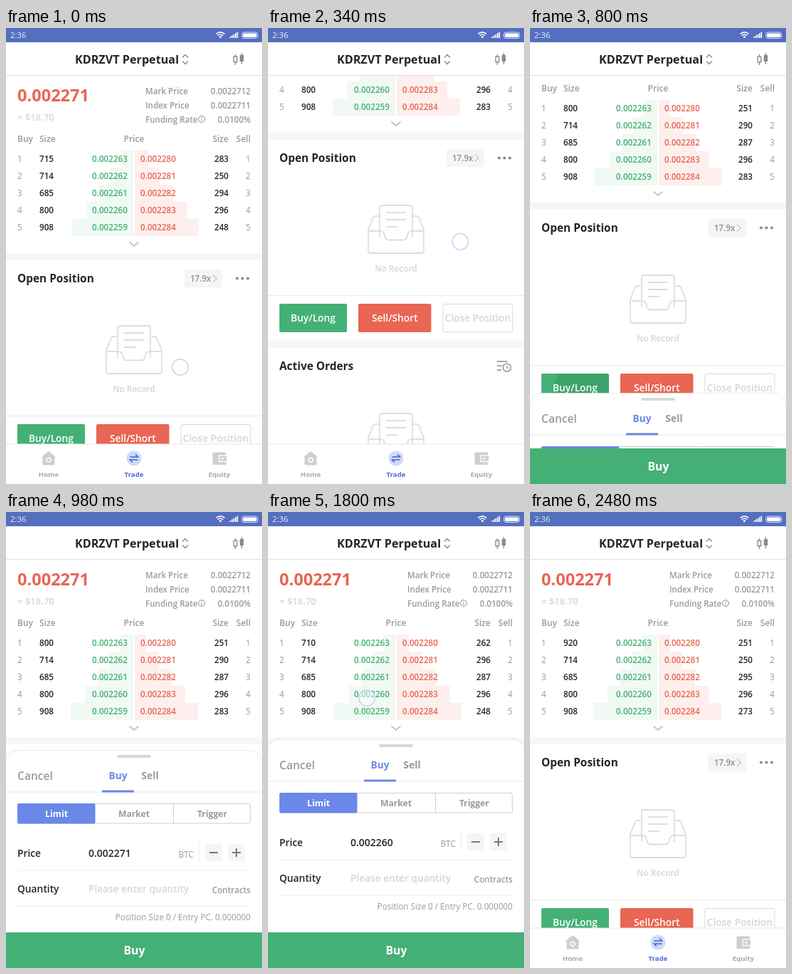
Write an HTML page that moves like this. It is 360 px wide and 640 px high and loops after 2.98 s.

```html
<!DOCTYPE html>
<html lang="en">
<head>
<meta charset="utf-8">
<title>Trade screen</title>
<style>
html, body { margin: 0; width: 100%; height: 100%; overflow: hidden; background: #fff; }
svg { display: block; width: 100vw; height: 100vh; font-family: "Open Sans", "Noto Sans", sans-serif; }
text { white-space: pre; }
</style>
</head>
<body>
<svg id="stage" viewBox="0 0 360 640" xmlns="http://www.w3.org/2000/svg"></svg>
<script>
const LOOP = 2980;
const GREEN = '#45b076', RED = '#e96554', BLUE = '#6a88e8', INK = '#24242a', GREY = '#9a9a9a', PALE = '#d6d6d6';
const stage = document.getElementById('stage');

// Order book states: [start ms, buy sizes, sell sizes, sell depth width]
const BOOKS = [
  [0, [715, 714, 685, 800, 908], [283, 250, 294, 296, 248], 90],
  [260, [800, 714, 685, 800, 908], [251, 290, 287, 296, 283], 89],
  [1300, [710, 714, 685, 800, 908], [262, 296, 287, 296, 248], 91],
  [1920, [920, 714, 685, 800, 908], [251, 250, 295, 296, 273], 88]
];
const PRICES = [[0, '0.002271'], [1320, '0.002282'], [1720, '0.002260']];

const text = (x, y, s, size, fill, weight = 500, anchor = 'start', id = '') =>
  `<text ${id && `id="${id}"`} x="${x}" y="${y}" font-size="${size}" fill="${fill}" font-weight="${weight}" text-anchor="${anchor}">${s}</text>`;
const rect = (x, y, w, h, fill, more = '') =>
  `<rect x="${x}" y="${y}" width="${w}" height="${h}" fill="${fill}" ${more}/>`;
const path = (d, stroke, width = 1, more = 'fill="none"') =>
  `<path d="${d}" stroke="${stroke}" stroke-width="${width}" ${more}/>`;
const dot = (x, y, r, fill, more = '') => `<circle cx="${x}" cy="${y}" r="${r}" fill="${fill}" ${more}/>`;

function statusBar() {
  const bars = [0, 1, 2, 3, 4].map(i => rect(314.5 + i * 2.5, 12 - i * 1.6, 1.7, 2 + i * 1.6, '#fff')).join('');
  return rect(0, 0, 360, 20, '#536fbe') +
    text(6, 14.3, '2:36', 11.3, '#eef1fc', 400) +
    path('M295.5 8.4Q301.5 3.4 307.5 8.4M297.6 10.6Q301.5 7.4 305.4 10.6', '#fff', 1.5) +
    path('M299.3 12L301.5 14.4L303.7 12Q301.5 10.4 299.3 12Z', 'none', 0, 'fill="#fff"') + bars +
    rect(331.5, 6, 22.5, 8.5, 'none', 'rx="3.5" stroke="#dbe2fa"') + rect(333, 7.5, 19.5, 5.5, '#fff', 'rx="2"');
}

function header() {
  return rect(0, 20, 360, 46, '#fff') + rect(0, 66, 360, 1, '#e2e2e2') +
    text(170, 49.5, 'KDRZVT Perpetual', 16.2, INK, 700, 'middle') +
    path('M248 41.5L252 37.5L256 41.5M248 46.5L252 50.5L256 46.5', '#8a8a8a', 1.4) +
    path('M322.5 37V40M322.5 48V52', '#8a8a8a', 1.4) + rect(320.2, 40.2, 4.6, 7.6, '#fff', 'stroke="#8a8a8a" stroke-width="1.4"') +
    path('M331.5 35V51', '#8a8a8a', 1.4) + rect(328.8, 38, 5.4, 9, '#8a8a8a');
}

function summary() {
  const pairs = [['Mark Price', '0.0022712', 93], ['Index Price', '0.0022711', 113], ['Funding Rate', '0.0100%', 132.5]];
  return text(16, 103, '0.002271', 23.6, RED, 700) + text(16, 129.5, '≈ $18.70', 13.1, PALE, 600) +
    pairs.map(([a, b, y]) => text(196, y, a, 11.6, GREY, 600) + text(344, y, b, 11.6, GREY, 600, 'end')).join('') +
    dot(275, 128, 4.4, 'none', 'stroke="#8a8a8a"') + path('M275 125.4V126.6M275 127.6V130.6', '#8a8a8a');
}

function book() {
  let s = text(16, 160, 'Buy', 12, GREY, 600) + text(47, 160, 'Size', 12, GREY, 600) +
    text(180, 160, 'Price', 12, GREY, 600, 'middle') + text(313, 160, 'Size', 12, GREY, 600, 'end') +
    text(344, 160, 'Sell', 12, GREY, 600, 'end');
  for (let i = 0; i < 5; i++) {
    const y = 188.3 + i * 24, top = 172 + i * 24;
    s += rect(0, top, 0, 24, '#f0f9f3', `id="bb${i}"`) + rect(181, top, 0, 24, '#fdefed', `id="sb${i}"`) +
      text(16, y, i + 1, 11.7, GREY) + text(47, y, '', 11.7, INK, 600, 'start', 'bs' + i) +
      text(121, y, '0.00' + (2263 - i), 11.7, GREEN, 600) +
      text(189, y, '0.00' + (2280 + i), 11.7, RED, 600) +
      text(313, y, '', 11.7, INK, 600, 'end', 'ss' + i) + text(344, y, i + 1, 11.7, GREY, 500, 'end');
  }
  return s + path('M173.5 300.5L180 306L186.5 300.5', '#c4c4c4', 1.8);
}

const emptyTray = dy => `<g transform="translate(0 ${dy})">` +
  path('M155.5 433H151Q149 433 148 435L141 452V482Q141 485 144 485H216Q219 485 219 482V452L212 435Q211 433 209 433H204.5', '#dedede', 1.8) +
  path('M157 463V421Q157 418 160 418H200Q203 418 203 421V463', '#dedede', 1.8) +
  path('M141 454H158Q162 454 163.5 458L165 463Q166 466.5 169 466.5H191Q194 466.5 195 463L196.5 458Q198 454 202 454H219', '#dedede', 1.8, 'fill="#fff"') +
  path('M166 428H194M166 438H194M166 448H182', '#dedede', 1.8) +
  text(180, 511, 'No Record', 11.9, PALE, 600, 'middle') + '</g>';

function position() {
  return rect(0, 316, 360, 10, '#f6f6f6') + text(16, 357.2, 'Open Position', 15.4, INK, 700) +
    rect(251, 339, 53, 25, '#f5f5f5', 'rx="2"') + text(259, 355.8, '17.9x', 11.6, '#8f8f8f', 600) +
    path('M291 346.5L296.5 351.5L291 356.5', '#c4c4c4', 1.2) +
    [325, 332.5, 340].map(x => dot(x, 351.5, 2.1, '#8c8c8c')).join('') +
    emptyTray(0) + rect(0, 544, 360, 1, '#e8e8e8') +
    rect(16, 556, 95, 40, GREEN, 'rx="2"') +
    `<g clip-path="url(#buyClip)">${dot(75, 576, 0, '#00461c', 'id="ripple"')}</g>` +
    rect(127, 556, 102.5, 40, RED, 'rx="2"') + rect(246, 556.5, 98, 39, '#fff', 'rx="2" stroke="#d9d9d9"') +
    text(63.5, 581.2, 'Buy/Long', 13.8, '#fff', 600, 'middle') +
    text(178.3, 581.2, 'Sell/Short', 13.8, '#fff', 600, 'middle') +
    text(295, 581.2, 'Close Position', 13.7, PALE, 600, 'middle');
}

function orders() {
  return rect(0, 608, 360, 10, '#f6f6f6') + text(16, 649.2, 'Active Orders', 15.4, INK, 700) +
    path('M322 637H337M322 643H329M322 649H328', '#8c8c8c', 1.4) +
    dot(336, 645.5, 5.6, '#fff', 'stroke="#8c8c8c" stroke-width="1.4"') + path('M336 642.5V646H338.8', '#8c8c8c', 1.2) +
    emptyTray(292);
}

function nav() {
  return rect(0, 584, 360, 56, '#fff') + rect(0, 583.5, 360, 1, '#e8e8e8') +
    path('M60 594L70.5 602.5H68.5V612Q68.5 613.5 67 613.5H53Q51.5 613.5 51.5 612V602.5H49.5Z', 'none', 0, 'fill="#cfcfcf"') +
    dot(60, 606.3, 3, 'none', 'stroke="#fff" stroke-width="1.6"') +
    dot(180, 604, 10.5, '#cfdaf9') +
    path('M174.5 602H185.5L182 598.5M185.5 606H174.5L178 609.5', '#3f60d4', 1.6) +
    rect(290.5, 595.5, 19, 17.5, '#cfcfcf', 'rx="1.5"') +
    rect(299.5, 600, 11.5, 8.5, '#cfcfcf', 'stroke="#fff" stroke-width="1.4"') + dot(304, 604.2, 1.5, '#fff') +
    text(60, 630, 'Home', 9.6, '#a8a8a8', 700, 'middle') + text(180, 630, 'Trade', 9.6, '#4a69dc', 700, 'middle') +
    text(300, 630, 'Equity', 9.6, '#a8a8a8', 700, 'middle');
}

function sheet() {
  return rect(0, 319, 360, 60, '#000', 'rx="17" opacity=".025"') + rect(-.5, 319.7, 361, 350, '#fff', 'rx="17" stroke="#ececec"') +
    rect(156, 326, 48, 4, '#d8d8d8', 'rx="2"') + text(16, 361.3, 'Cancel', 15.6, GREY, 600) +
    rect(0, 377.5, 360, 1, '#e6e6e6') + rect(135, 375.5, 45, 3, BLUE) +
    text(157.5, 360.3, 'Buy', 13.7, BLUE, 700, 'middle') + text(202.5, 360.3, 'Sell', 14, GREY, 700, 'middle') +
    rect(16.5, 394.5, 327, 27.5, '#fff', 'rx="2" stroke="#cfcfcf"') + rect(16, 394, 109.5, 28.5, BLUE, 'rx="2"') +
    rect(235, 394.5, 1, 27.5, '#cfcfcf') +
    text(71, 412.8, 'Limit', 12.4, '#fff', 700, 'middle') + text(180, 412.8, 'Market', 12.2, GREY, 700, 'middle') +
    text(290, 412.8, 'Trigger', 12.2, GREY, 700, 'middle') +
    text(16, 468.5, 'Price', 13.8, INK, 600) + text(116, 468.5, '', 14, INK, 600, 'start', 'price') +
    text(264, 469.8, 'BTC', 12, GREY, 500, 'end') + rect(271.5, 449, 1, 27, '#ececec') +
    rect(280, 451, 24, 24, '#f5f5f5', 'rx="2"') + rect(312, 451, 24, 24, '#f5f5f5', 'rx="2"') +
    path('M286 463H298M318 463H330M324 457V469', '#777', 2) +
    rect(16, 487.5, 328, 1, '#ebebeb') + text(16, 518.7, 'Quantity', 13.8, INK, 600) +
    text(116, 518.5, 'Please enter quantity', 13.7, PALE, 600) + text(344, 520, 'Contracts', 11.7, GREY, 600, 'end') +
    rect(16, 537.5, 328, 1, '#ebebeb') +
    text(344, 558, 'Position Size 0 / Entry PC. 0.000000', 11.7, GREY, 500, 'end');
}

stage.innerHTML =
  `<defs><clipPath id="buyClip">${rect(16, 556, 95, 40, '#000', 'rx="2"')}</clipPath></defs>` +
  rect(0, 0, 360, 640, '#fff') +
  `<g id="page">${summary()}${book()}${position()}${orders()}</g>` + header() + statusBar() + nav() +
  `<g id="sheet">${sheet()}</g>` +
  `<g id="submit">${rect(0, 590, 360, 50, GREEN)}${text(180.5, 620.8, 'Buy', 15.8, '#fff', 700, 'middle')}</g>` +
  dot(0, 0, 11.3, '#fff', 'id="touch" fill-opacity=".45" stroke="#ccd3f0" stroke-width="1.5"');

const $ = id => document.getElementById(id);
const set = (id, attrs) => { for (const k in attrs) $(id).setAttribute(k, attrs[k]); };
const clamp = v => Math.max(0, Math.min(1, v));
const ramp = (t, start, span) => clamp((t - start) / span);
const easeOut = (t, start, span, power) => 1 - Math.pow(1 - ramp(t, start, span), power);
const current = (list, t) => list.filter(e => e[0] <= t).pop();

let shown;
function showBook(entry) {
  if (shown === entry) return;
  shown = entry;
  const [, buys, sells, depth] = entry;
  const total = sells.reduce((a, b) => a + b);
  let buy = 0, sell = 0;
  for (let i = 0; i < 5; i++) {
    buy += buys[i];
    sell += sells[i];
    const w = buy / 44.4;
    set('bb' + i, { x: 179 - w, width: w });
    set('sb' + i, { width: sell / total * depth });
    $('bs' + i).textContent = buys[i];
    $('ss' + i).textContent = sells[i];
  }
}

// Touch point position and opacity
function touchAt(t) {
  if (t < 560) {
    const k = easeOut(t, 20, 520, 4);
    return [245 + 26 * k, 476 - 180 * k, 1 - ramp(t, 440, 100)];
  }
  const tap = (x, y, a, b) => [x, y, Math.min(ramp(t, a, 50), 1 - ramp(t, b - 90, 90))];
  if (t < 1000) return tap(75, 393, 580, 740);
  if (t < 1600) return tap(214, 233, 1260, 1460);
  return tap(139, 261, 1660, 1890);
}

function draw(t) {
  // Whole pixels keep the moving edges crisp
  const scroll = Math.round(185 * (easeOut(t, 20, 520, 2.54) - easeOut(t, 733, 200, 2.31)));
  set('page', { transform: `translate(0 ${-scroll})` });
  showBook(current(BOOKS, t));
  $('price').textContent = current(PRICES, t)[1];

  const open = easeOut(t, 732, 328, 2.15) - easeOut(t, 2200, 280, 2.15);
  const drop = Math.round(320 * (1 - open));
  const visible = open > .001 ? 'visible' : 'hidden';
  set('sheet', { transform: `translate(0 ${drop})`, visibility: visible });
  set('submit', { transform: `translate(0 ${Math.max(0, drop - 270)})`, visibility: visible });

  set('ripple', { r: 75 * ramp(t, 640, 300), opacity: .12 * (1 - ramp(t, 820, 130)) });
  const [x, y, alpha] = touchAt(t);
  set('touch', { cx: x, cy: y, opacity: alpha });
}

const begin = performance.now();
function frame() {
  draw((performance.now() - begin) % LOOP);
  requestAnimationFrame(frame);
}
draw(0);
requestAnimationFrame(frame);
</script>
</body>
</html>
```
